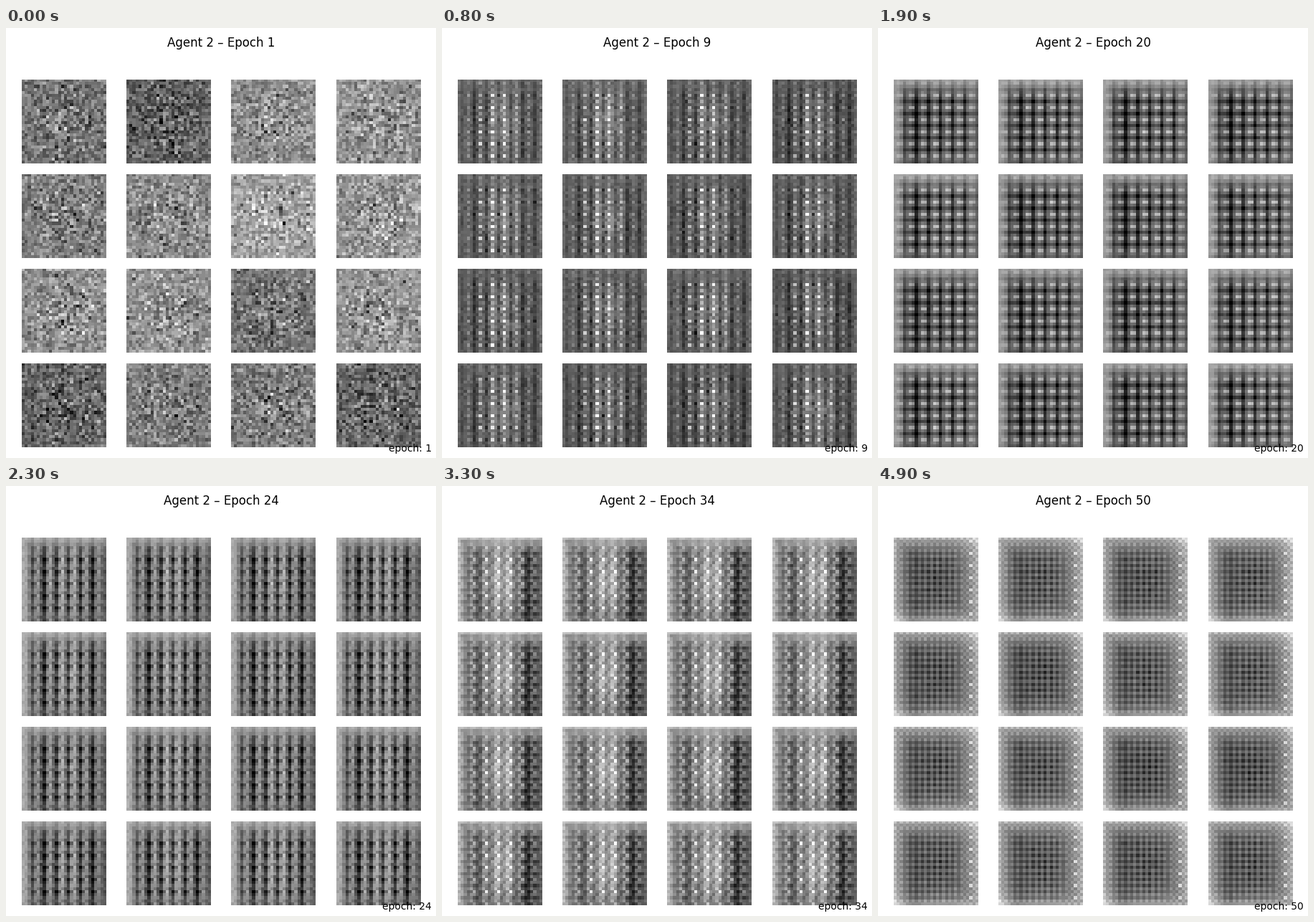
These frames come from a looping animation (600 px wide and 600 px high, 5 s). A matplotlib script:

```python
import numpy as np
import matplotlib.pyplot as plt
from matplotlib.animation import FuncAnimation

EPOCHS, GRID, N = 50, 4, 28
Y, X = np.mgrid[0:N, 0:N].astype(float)


def step(d, width=1.0):
    return 1 / (1 + np.exp(-d / width))


def bell(v, mid, width):
    return np.exp(-((v - mid) / width) ** 2)


def ridge(v, at, sharp=2):
    """Repeats every four pixels: 1 on the line, 0 between lines."""
    return ((1 + np.cos(np.pi / 2 * (v - at))) / 2) ** sharp


def dot(row, col, sharp=4):
    return ridge(Y, row, sharp) * ridge(X, col, sharp)


# Soft regions of a sample.
INNER = step(X - 2.5) * step(26 - X) * step(Y - 3.5) * step(26.5 - Y)
CENTRE = bell(X, 14.5, 6) * bell(Y, 14, 11)
LEFT = bell(X, 6, 3.2) * step(Y - 3.5)
RIGHT = bell(X, 23, 3.2) * step(Y - 3)
CORNER = np.exp(-np.minimum(X, Y) / 2.5)
FAR_EDGE = np.exp(-np.minimum(N - 1 - X, N - 1 - Y) / 2.5)
BODY = 0.25 + 0.75 * INNER
ODD_X, ODD_Y = X % 2, Y % 2
CHECKER = 1 - 2 * ((X + Y) % 2)


def columns_and_sparks():
    sparks = 0.55 * dot(1, 3) + 0.2 * dot(3, 3) - 0.15 * dot(1, 1) - 0.12 * dot(3, 2)
    stripes = -0.13 * ridge(X, 1, 3) * (0.5 + 0.5 * INNER)
    return (0.4 + 0.13 * CENTRE - 0.06 * (LEFT + RIGHT) + stripes
            + BODY * (0.35 + 0.65 * bell(X, 12, 7)) * sparks)


def dark_knots():
    lattice = (0.3 * dot(3, 0) + 0.12 * dot(3, 2) + 0.1 * dot(1, 1) - 0.3 * dot(1, 3)
               - 0.13 * ridge(Y, 1, 3) - 0.13 * ridge(X, 3, 3))
    return 0.59 + 0.14 * CENTRE - 0.17 * LEFT - 0.06 * RIGHT + 0.12 * CORNER + BODY * lattice


def woven():
    lattice = 0.42 * dot(1, 1.5) - 0.3 * ridge(X, 3) - 0.2 * ridge(Y, 3)
    return 0.53 - 0.1 * LEFT + 0.12 * CORNER + BODY * lattice


def slanted():
    lean = 1 - (Y + 1) % 4 / 3
    strokes = 0.2 * np.cos(np.pi / 2 * (X - lean)) + 0.22 * dot(3, 1) - 0.22 * dot(1, 1)
    return 0.5 + 0.1 * CENTRE - 0.13 * RIGHT + 0.1 * CORNER + BODY * strokes


def glowing_middle():
    middle = bell(X, 13, 6.5)
    sparks = ODD_Y * (0.75 * ridge(X, 1, 3) + 0.4 * ridge(X, 3, 3)) * (1.3 * middle - 0.5)
    return (0.46 + 0.18 * CENTRE - 0.1 * LEFT - 0.16 * RIGHT + 0.24 * CORNER
            + BODY * (0.5 * sparks + 0.05 * CHECKER) - 0.07 * (ODD_Y - 0.5))


def dark_middle():
    pits = ODD_X * ODD_Y * (0.22 + 0.1 * CENTRE) * step(22 - X)
    sparks = 0.4 * dot(1, 1.3) * step(X - 23.5, 0.5)
    return (0.48 - 0.08 * CENTRE - 0.1 * LEFT + 0.22 * CORNER + 0.2 * FAR_EDGE
            + BODY * (sparks - pits) + 0.06 * CHECKER)


LOOKS = {1: np.full((N, N), 0.52), 9: columns_and_sparks(), 16: dark_knots(),
         20: woven(), 28: slanted(), 41: glowing_middle(), 50: dark_middle()}
KEYS = sorted(LOOKS)


def shared_look(epoch):
    """Blend neighbouring looks while keeping the contrast up."""
    i = min(np.searchsorted(KEYS, epoch, side="right"), len(KEYS) - 1)
    a, b = KEYS[i - 1], KEYS[i]
    u = (epoch - a) / (b - a)
    mix = (1 - u) * (LOOKS[a] - 0.5) + u * (LOOKS[b] - 0.5)
    return 0.5 + mix / np.hypot(1 - u, u)


def samples(epoch):
    rng = np.random.default_rng(100 + epoch)
    shared = shared_look(epoch)
    grain = 0.02 + 0.15 * np.exp(-(epoch - 1) / 6)
    depth = 0.5 + 0.5 * bell(X, 14, 11) * bell(Y, 14, 11)
    for shift in rng.normal(0, 0.4 * grain, GRID * GRID):
        noise = rng.normal(0, grain, (N, N)) * depth
        yield np.clip(shared + noise + shift, 0, 1)


fig, axes = plt.subplots(GRID, GRID, figsize=(6, 6), dpi=100)
fig.subplots_adjust(left=0.025, right=0.975, bottom=0.025, top=0.88,
                    wspace=0.1143, hspace=0.1233)
images = []
for ax in axes.flat:
    ax.axis("off")
    images.append(ax.imshow(np.zeros((N, N)), cmap="gray", vmin=0, vmax=1))
title = fig.suptitle("", fontsize=12)
counter = fig.text(0.99, 0.01, "", ha="right", va="bottom", fontsize=10)


def update(frame):
    epoch = frame + 1
    for image, data in zip(images, samples(epoch)):
        image.set_data(data)
    title.set_text(f"Agent 2 – Epoch {epoch}")
    counter.set_text(f"epoch: {epoch}")
    return [*images, title, counter]


anim = FuncAnimation(fig, update, frames=EPOCHS, interval=100, repeat=True)
plt.show()
```
